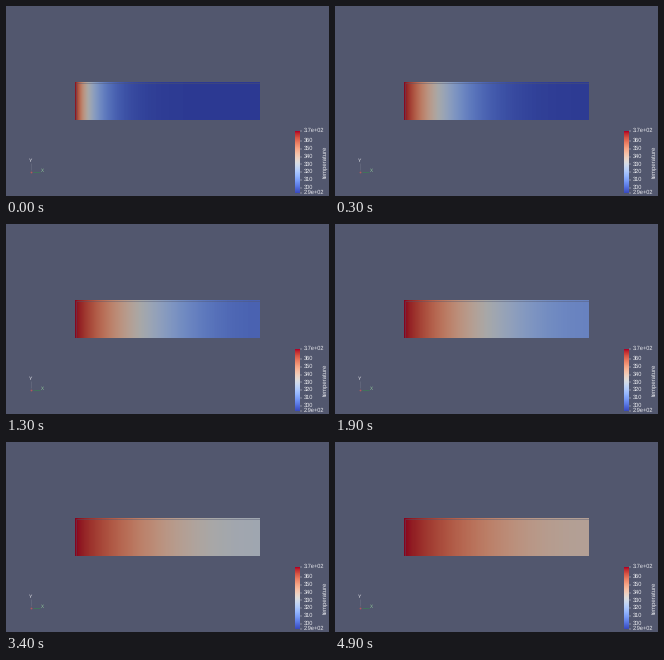
A matplotlib script that plays this animation: 323 by 190 pixels, repeating every 5 s.

```python
import numpy as np
import matplotlib.pyplot as plt
from matplotlib.animation import FuncAnimation
from matplotlib.patches import Rectangle

plt.rcParams["text.hinting"] = "none"

W, H, DPI = 323, 190, 100
FRAMES, INTERVAL = 50, 100
BAR = (69, 254, 76, 114)            # left, right, top, bottom
LEGEND = (289, 294, 125, 187)
T_MIN, T_MAX = 293, 373
RATE = 0.011                        # diffusivity times one solver step
SHADE = 0.76                        # surface lighting on the bar
HOLDS = {12, 29, 30, 35, 36, 43, 44, 45, 46, 47}
BACK, INK = "#52576e", "#e6e7ec"

cmap = plt.get_cmap("coolwarm")
fig = plt.figure(figsize=(W / DPI, H / DPI), dpi=DPI, facecolor=BACK)
ax = fig.add_axes([0, 0, 1, 1])
ax.axis("off")


def px(size):
    return size * 72 / DPI


def label(x, y, text, size=5.7, **kw):
    kw = {"ha": "left", "va": "center", "color": INK, **kw}
    ax.text(x, y, text, fontsize=px(size), family="Liberation Sans", **kw)


def line(xs, ys, color, width=0.8):
    ax.plot(xs, ys, color=color, lw=px(width), solid_capstyle="butt")


def strip(rgb, box):
    left, right, top, bottom = box
    return ax.imshow(rgb, extent=(left, right, bottom, top), aspect="auto",
                     interpolation="nearest")


def temperature(step):
    """Implicit Euler steps: heated left wall, insulated right, cold start."""
    x = (np.arange(BAR[1] - BAR[0]) + 0.5) / (BAR[1] - BAR[0])
    k = (np.arange(100)[:, None] + 0.5) * np.pi
    modes = 2 / k * np.sin(k * x) / (1 + k**2 * RATE) ** step
    return np.clip(1 - modes.sum(axis=0), 0, 1)


def bar_colors(frame):
    step = 1 + sum(i not in HOLDS for i in range(1, frame + 1))
    return cmap(temperature(step))[None, :, :3] * SHADE


def soften_edges():
    left, right, top, bottom = BAR
    ax.add_patch(Rectangle((left + 0.5, top + 0.5), right - left - 1,
                           bottom - top - 1, fill=False, ec=BACK,
                           lw=px(1), alpha=0.4, zorder=2))


def draw_legend():
    left, right, top, bottom = LEGEND
    ramp = np.linspace(1, 0, bottom - top)
    strip(cmap(ramp)[:, None, :3], LEGEND)
    for value in range(300, 370, 10):
        y = bottom - (value - T_MIN) / (T_MAX - T_MIN) * (bottom - top)
        line([right, right + 1.5], [y, y], INK, 0.4)
        label(298, y - 0.4, str(value))
    for y, text in ((top, "3.7e+02"), (bottom, "2.9e+02")):
        line([right, right + 1.5], [y, y], INK, 0.4)
        label(297.3, y - 0.4, text)
    label(319.7, 155.3, "temperature", 6, rotation=90, ha="center")


def draw_axes_marker():
    line([24.5, 24.5], [157, 164], "#666b80", 0.7)
    line([27, 34], [165.5, 165.5], "#3f7a58", 0.8)
    ax.plot(25, 165.5, "o", color="#b5595c", ms=px(1.8), mew=0)
    label(25, 154.5, "Y", 5, ha="center")
    label(36, 165, "X", 4.5, ha="center", color="#8fc79a")


bar = strip(bar_colors(0), BAR)
soften_edges()
draw_legend()
draw_axes_marker()
ax.set_xlim(0, W)
ax.set_ylim(H, 0)


def update(frame):
    bar.set_data(bar_colors(frame))
    return [bar]


anim = FuncAnimation(fig, update, frames=FRAMES, interval=INTERVAL,
                     repeat=True, repeat_delay=0)
plt.show()
```
